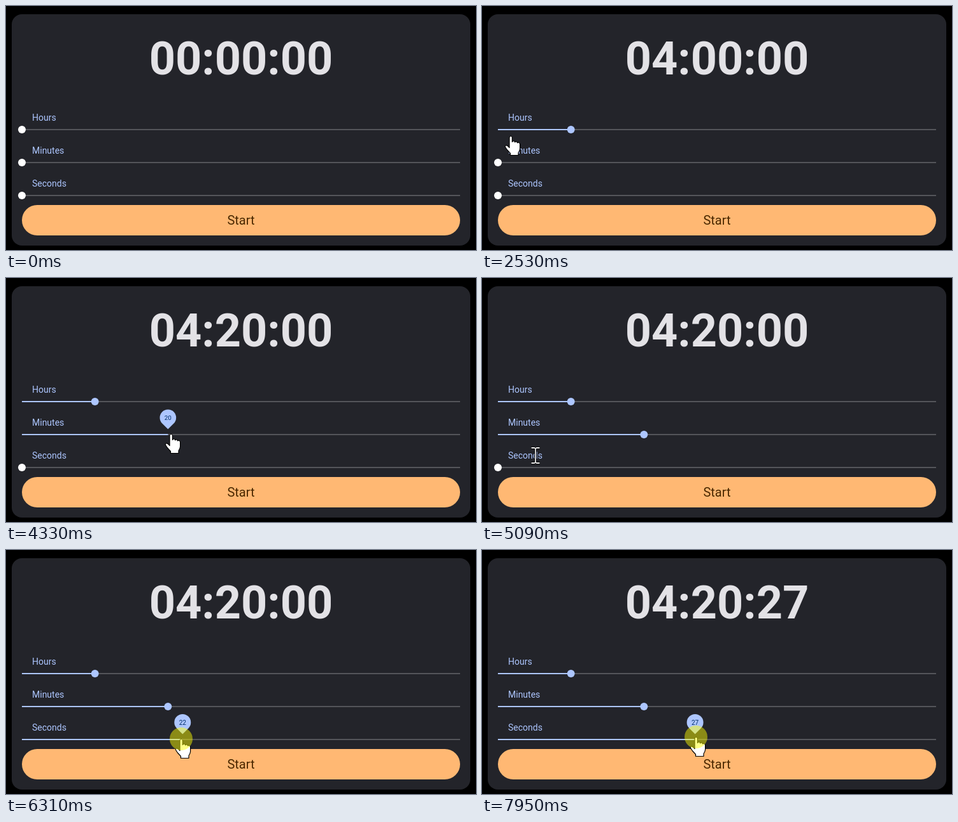
Animation, 738 px wide and 385 px high, one loop 8 s. Source, as an HTML page:

```html
<!DOCTYPE html>
<html lang="en">
<head>
<meta charset="utf-8">
<title>Countdown timer</title>
<style>
html, body { margin: 0; width: 100%; height: 100%; overflow: hidden; background: #000; }
svg { display: block; width: 738px; height: 385px; font-family: Roboto, sans-serif; }
</style>
</head>
<body>
<svg id="stage" viewBox="0 0 738 385">
  <rect width="738" height="385" fill="#000"/>
  <rect x="9" y="13" width="720" height="365" rx="16" fill="#23242a"/>
  <text id="clock" x="369" y="108" font-size="72" font-weight="700" fill="#e3e2e6" text-anchor="middle"></text>
  <g id="labels" font-size="14" fill="#adc6ff"></g>
  <rect x="25" y="314" width="688" height="48" rx="24" fill="#ffb873"/>
  <text x="369" y="345" font-size="20" fill="#4a2800" text-anchor="middle">Start</text>
  <g id="sliders"></g>
  <path id="hand" fill="#fff" stroke="#000" stroke-width="1.2" stroke-linejoin="round"
    d="M-2 2.5Q-1.8.5 .2.5T2.4 2.5V9.5Q2.8 8 4.6 8T6.6 10Q7 8.8 8.6 9T10.6 11Q11 10.2 12.6 10.5T14.6 13V20Q14.4 23 12 26.5V30.5H-.5V27.5L-5.5 22Q-7.5 19-8.6 17.2Q-9 15.4-7.4 15Q-5.4 14.6-3.6 16.8L-2 18.5Z"/>
  <g id="beam" fill="none">
    <path stroke="#000" stroke-width="3.6" d="M0-11V11M-7-12H-2L0-11L2-12H7M-7 12H-2L0 11L2 12H7"/>
    <path stroke="#e8e8e8" stroke-width="1.8" d="M0-11V11M-6.5-12H-2L0-11L2-12H6.5M-6.5 12H-2L0 11L2 12H6.5"/>
  </g>
  <circle id="click" r="18" fill="#ff0" fill-opacity=".47"/>
</svg>
<script>
const LOOP = 8000, LEFT = 25, WIDTH = 688;
const $ = id => document.getElementById(id);
const clamp = v => Math.max(0, Math.min(1, v));
const smooth = p => p * p * (3 - 2 * p);
const outCubic = p => 1 - (1 - p) ** 3;
const linear = p => p;

function add(parent, tag, attrs, text = '') {
  const node = document.createElementNS('http://www.w3.org/2000/svg', tag);
  set(node, attrs);
  node.textContent = text;
  parent.appendChild(node);
  return node;
}
function set(node, attrs) {
  for (const key in attrs) node.setAttribute(key, attrs[key]);
}
const show = (node, on) => set(node, { visibility: on ? 'visible' : 'hidden' });

// Pointer legs: first step, last step, number of steps, x, y, easing
const legs = [
  [120, 120, 1, 474, 331, linear],
  [185, 900, 12, 31, 202, smooth],
  [960, 1080, 2, 29, 199, linear],
  [1345, 1650, 6, 108, 190, linear],
  [1890, 1960, 2, 134, 190, linear],
  [2280, 2530, 5, 45, 205, smooth],
  [2590, 2920, 6, 29, 239, outCubic],
  [3040, 3110, 2, 28, 246, linear],
  [3320, 3570, 4, 129, 246, linear],
  [3640, 3830, 4, 239, 246, linear],
  [3970, 4020, 2, 259, 246, linear],
  [4390, 4900, 9, 104, 262, smooth],
  [4960, 5090, 3, 84, 280, linear],
  [5160, 5420, 5, 33, 300, outCubic],
  [5610, 5610, 1, 31, 298, linear],
  [5810, 6310, 9, 275, 298, smooth],
  [6370, 6430, 2, 290, 297, linear],
  [6990, 7380, 6, 331, 295, linear],
  [7760, 7950, 4, 336, 295, linear]
];

// Value legs use the same layout: first step, last step, steps, value, easing
const sliders = [
  { name: 'Hours', y: 195, max: 24, down: 1280, up: 2210,
    drag: [[1345, 1650, 6, 3, linear], [1890, 1960, 2, 4, linear]],
    readout: [[1830, 3], [2210, 4]] },
  { name: 'Minutes', y: 247, max: 60, down: 3250, up: 4330,
    drag: [[3320, 3570, 4, 8, linear], [3640, 3830, 4, 19, linear], [3970, 4020, 2, 20, linear]],
    readout: [[4330, 20]] },
  { name: 'Seconds', y: 299, max: 60, down: 5750, up: LOOP,
    drag: [[5810, 6310, 9, 22, smooth], [6370, 6430, 2, 23, linear], [6990, 7380, 6, 27, linear]],
    readout: [[6810, 23], [7560, 27]] }
];

function stepped(t, start, end, count) {
  if (t < start) return 0;
  if (t >= end) return 1;
  return (1 + Math.floor((t - start) / (end - start) * (count - 1) + 1e-6)) / count;
}

function pointerAt(t) {
  let x = legs[0][3], y = legs[0][4];
  for (const [start, end, count, toX, toY, ease] of legs) {
    const p = ease(stepped(t, start, end, count));
    x += (toX - x) * p;
    y += (toY - y) * p;
  }
  return { x, y };
}

function valueAt(slider, t) {
  let value = 0;
  for (const [start, end, count, to, ease] of slider.drag)
    value += (to - value) * ease(stepped(t, start, end, count));
  return Math.round(value);
}

for (const s of sliders) {
  add($('labels'), 'text', { x: 41, y: s.y - 14 }, s.name);
  const layer = $('sliders');
  add(layer, 'rect', { x: LEFT, y: s.y - 1, width: WIDTH, height: 2, fill: '#54555a' });
  s.fill = add(layer, 'rect', { x: LEFT, y: s.y - 1, height: 2, fill: '#adc6ff' });
  s.thumb = add(layer, 'circle', { cy: s.y });
  s.balloon = add(layer, 'g', {});
  add(s.balloon, 'path', { fill: '#adc6ff', d: 'M0-8.6L-9.2-17.8A13 13 0 1 1 9.2-17.8Z' });
  s.number = add(s.balloon, 'text',
    { y: -23.5, 'font-size': 10, fill: '#002e69', 'text-anchor': 'middle' });
}

function draw(t) {
  const { x, y } = pointerAt(t);
  let pressed = false;

  for (const s of sliders) {
    const value = valueAt(s, t);
    const length = WIDTH * value / s.max;
    const open = outCubic(clamp((t - s.down - 40) / 200)) * (1 - outCubic(clamp((t - s.up) / 200)));
    pressed ||= t >= s.down && t < s.up;
    set(s.fill, { width: length });
    set(s.thumb, { cx: LEFT + length, r: 6 * (1 - open), fill: value ? '#adc6ff' : '#fff' });
    set(s.balloon, { transform: `translate(${LEFT + length} ${s.y}) scale(${open})` });
    s.number.textContent = value;
  }

  $('clock').textContent = sliders.map(s => {
    const shown = s.readout.filter(([at]) => t >= at).pop();
    return String(shown ? shown[1] : 0).padStart(2, '0');
  }).join(':');

  const overLabel = x > 41 && x < 97 && sliders.some(s => Math.abs(y - s.y + 19) < 10);
  const place = { transform: `translate(${x} ${y})` };
  for (const id of ['hand', 'beam', 'click']) set($(id), place);
  show($('hand'), t >= 120 && !overLabel);
  show($('beam'), t >= 120 && overLabel);
  show($('click'), pressed);
}

const began = performance.now();
function tick() {
  draw((performance.now() - began) % LOOP);
  requestAnimationFrame(tick);
}
draw(0);
requestAnimationFrame(tick);
</script>
</body>
</html>
```
